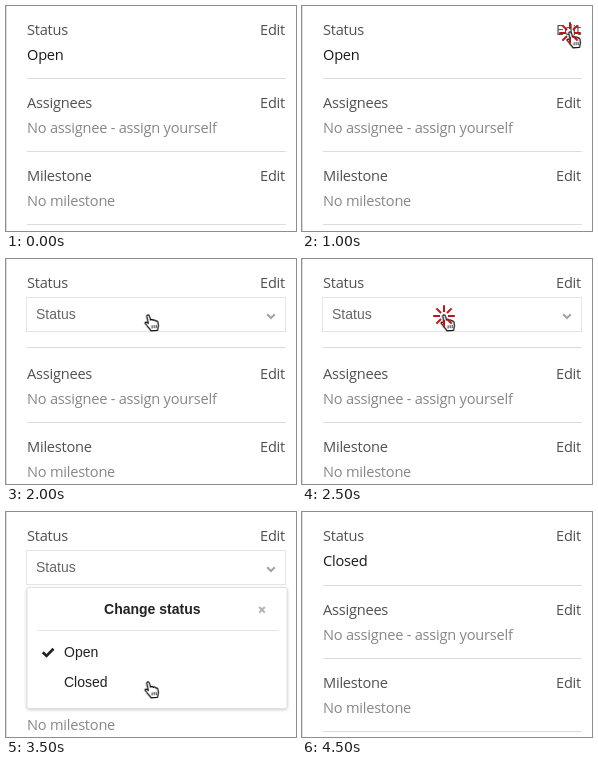
An HTML page for the animation above (6000 ms loop, 290 by 225 pixels).

```html
<!DOCTYPE html>
<html lang="en">
<head>
<meta charset="utf-8">
<title>Change status</title>
<style>
html, body { margin: 0; width: 100%; height: 100%; overflow: hidden; background: #fff; }
svg { display: block; width: 290px; height: 225px; }
text { font: 14.6px "Open Sans", "Noto Sans", sans-serif; letter-spacing: -.23px; fill: #505050; }
.edit { text-anchor: end; }
.value { fill: #1a1a1a; }
.muted { fill: #878787; }
.ui text { font: 14px "Liberation Sans", Arial, sans-serif; letter-spacing: 0; fill: #222; }
.ui .hint { fill: #666; }
.ui .title { font-weight: bold; text-anchor: middle; }
.rule { fill: #dcdcdc; }
.anim { animation: 6s step-end infinite; }
.open { animation-name: open; }
.closed { animation-name: closed; }
.select { animation-name: select; }
.panel { animation-name: panel; }
.first { animation-name: first; }
.rest { animation-name: rest; }
.cursor { animation-name: cursor; }
.burst { animation-name: burst; }
@keyframes open { 0% { opacity: 1 } 25%, 100% { opacity: 0 } }
@keyframes closed { 0% { opacity: 0 } 75%, 100% { opacity: 1 } }
@keyframes select { 0% { opacity: 0 } 25% { opacity: 1 } 75%, 100% { opacity: 0 } }
@keyframes panel { 0% { opacity: 0 } 50% { opacity: 1 } 75%, 100% { opacity: 0 } }
@keyframes first {
  0% { transform: none }
  25% { transform: translateY(16px) }
  75%, 100% { transform: translateY(1px) }
}
@keyframes rest {
  0% { transform: none }
  25% { transform: translateY(18px) }
  75%, 100% { transform: translateY(1px) }
}
@keyframes cursor {
  0% { opacity: 0; transform: translate(263px, 25px) }
  8.3333% { opacity: 1; transform: translate(263px, 25px) }
  25% { opacity: 0; transform: translate(137px, 55px) }
  33.3333% { opacity: 1; transform: translate(137px, 55px) }
  50% { opacity: 0; transform: translate(137px, 169px) }
  58.3333% { opacity: 1; transform: translate(137px, 169px) }
  75%, 100% { opacity: 0; transform: translate(137px, 169px) }
}
@keyframes burst {
  0% { opacity: 0 }
  16.6666% { opacity: 1 }
  25% { opacity: 0 }
  41.6666% { opacity: 1 }
  50% { opacity: 0 }
  66.6666% { opacity: 1 }
  75%, 100% { opacity: 0 }
}
</style>
</head>
<body>
<svg viewBox="0 0 290 225">
  <rect class="rule" width="1" height="225"/>

  <text x="21" y="29">Status</text>
  <text class="edit" x="279" y="29">Edit</text>
  <text class="value anim open" x="21" y="54">Open</text>
  <text class="value anim closed" x="21" y="54">Closed</text>
  <rect class="rule anim first" x="21" y="72" width="259" height="1"/>

  <g class="anim rest">
    <text x="21" y="102">Assignees</text>
    <text class="edit" x="279" y="102">Edit</text>
    <text class="muted" x="21" y="127">No assignee - assign yourself</text>
    <rect class="rule" x="21" y="145" width="259" height="1"/>
    <text x="21" y="175">Milestone</text>
    <text class="edit" x="279" y="175">Edit</text>
    <text class="muted" x="21" y="200">No milestone</text>
    <rect class="rule" x="21" y="218" width="259" height="1"/>
  </g>

  <g class="ui anim select">
    <rect x="20.5" y="38.5" width="259" height="34" fill="#fff" stroke="#e5e5e5"/>
    <text class="hint" x="30" y="60">Status</text>
    <path d="M261.2 55.2l3.8 3.8 3.8-3.8" fill="none" stroke="#a4a4a4" stroke-width="2"/>
  </g>

  <g class="ui anim panel">
    <rect x="21" y="75.5" width="260" height="121" rx="2" fill="#fff" stroke="#e2e2e2"
      style="filter: drop-shadow(0 1px 1.5px #0003)"/>
    <text class="title" x="146.3" y="102">Change status</text>
    <path d="M253.2 95l5.6 5.6m0-5.6l-5.6 5.6" stroke="#b2b2b2" stroke-width="2"/>
    <rect x="32" y="118" width="241" height="1" fill="#e4e4e4"/>
    <path d="M36.8 140.2l3.7 3.7 7-7.2" fill="none" stroke="#222" stroke-width="2.7"/>
    <text x="58" y="145">Open</text>
    <text x="58" y="175">Closed</text>
  </g>

  <g class="anim cursor">
    <g transform="translate(.7 0) scale(1.03)">
      <path fill="#fff" stroke="#111" stroke-width="1.2" stroke-linejoin="round"
        d="M4.4 9.2L2.9 2.6C2.6.6 4.9.1 5.4 2L6.6 6C7.2 5 8.7 5.1 9.1 6.3C9.9 5.4 11.3 5.8 11.6 6.9C12.5 6.4 13.5 7 13.7 8.2L14.2 11C14.3 12.6 13.5 13.4 13.4 15.8L6.9 16.3C6.4 14.5 4.3 13.3 3.3 11.6C2.7 10.3 1 9.4 1.3 8.5C1.8 7.3 3.6 8.2 4.4 9.2Z"/>
      <path d="M8 11v3M10 10.8v3M12 10.6v3" stroke="#111" stroke-width=".8"/>
    </g>
    <g class="anim burst" stroke="#c4121a" stroke-width="2">
      <path d="M5-2V-8.8M5 6V12.8M1 2H-5.8M9 2H15.8"/>
      <path d="M2-1l-4.6-4.6M8-1l4.6-4.6M2 5l-4.6 4.6M8 5l4.6 4.6"/>
    </g>
  </g>
</svg>
</body>
</html>
```
